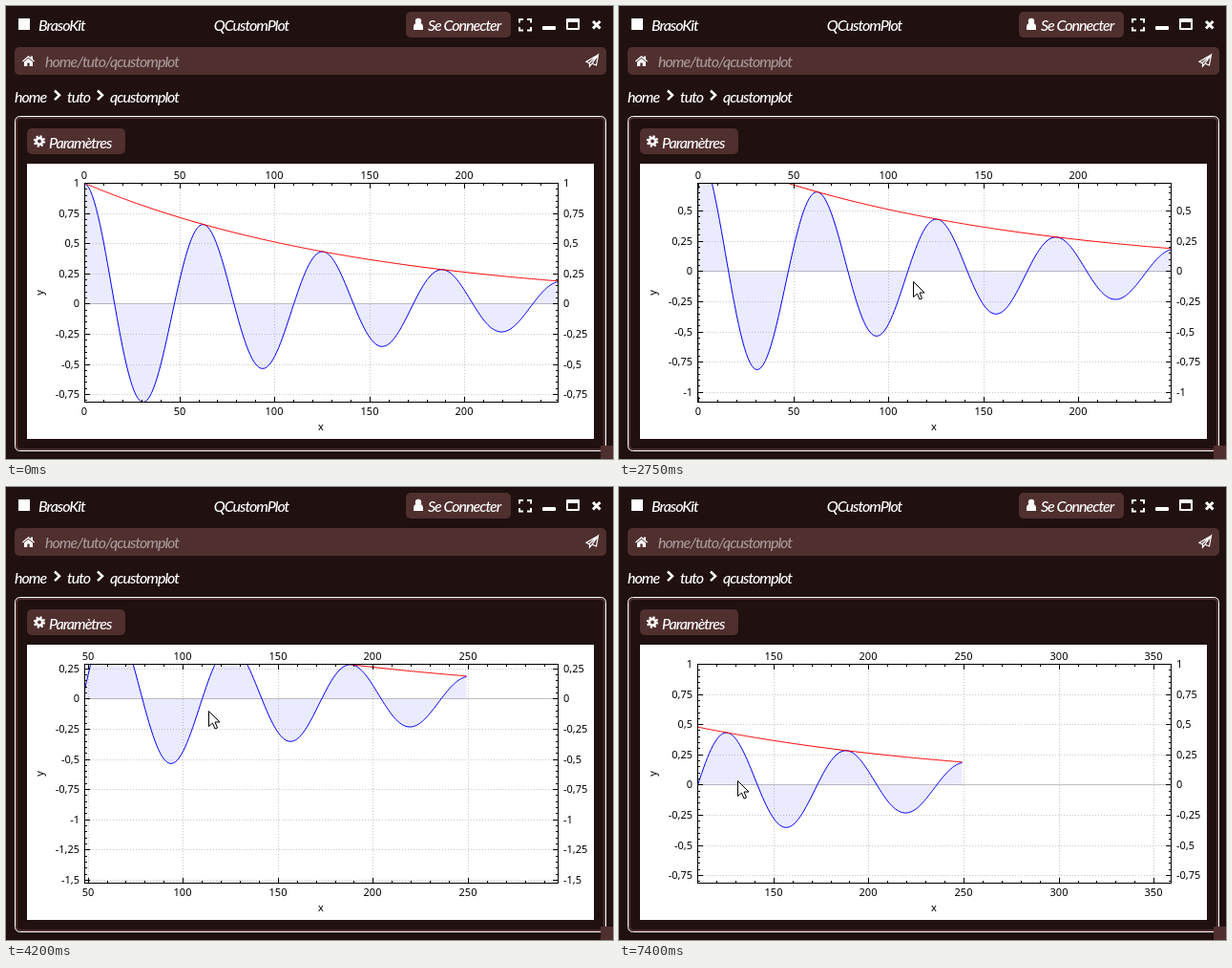
These frames come from a looping animation (636x474 px, 8 s). An HTML page:

```html
<!DOCTYPE html>
<html lang="fr">
<head>
<meta charset="utf-8">
<title>QCustomPlot</title>
<style>
html, body { margin: 0; width: 100%; height: 100%; overflow: hidden; background: #201010; }
svg { display: block; }
.ui { font: italic 500 16px Lato, "Open Sans", sans-serif; letter-spacing: -1px; fill: #fff; }
.tick { font: 11px "Noto Sans", "Open Sans", sans-serif; fill: #000; }
.mid { text-anchor: middle; }
.end { text-anchor: end; }
.panel { fill: #502f2f; }
.icon { fill: none; stroke: #fff; stroke-width: 2; }
.crisp { shape-rendering: crispEdges; }
.line { fill: none; stroke-width: 1; }
</style>
</head>
<body>
<svg width="636" height="474" viewBox="0 0 636 474">
  <defs>
    <clipPath id="area"><rect x="82" y="185" width="497" height="230"/></clipPath>
  </defs>
  <rect width="636" height="474" fill="#201010"/>

  <g class="ui">
    <rect x="13" y="13" width="12" height="12"/>
    <text x="34" y="26">BrasoKit</text>
    <text x="257" y="26" class="mid">QCustomPlot</text>

    <rect x="419" y="6" width="110" height="27" rx="5" class="panel"/>
    <circle cx="432" cy="16" r="3.2"/>
    <path d="M427 25v-2.500q0-4 2.500-4.500q2.500 2 5 0q2.500.5 2.500 4.500V25z"/>
    <text x="442" y="26">Se Connecter</text>

    <path class="icon" d="M538 17.500V14h4M546 14h4v3.500M550 22v3.500h-4M542 25.500h-4V22"/>
    <rect x="562" y="21" width="14" height="4" rx="1"/>
    <path fill-rule="evenodd" d="M588 13h12q1 0 1 1v10q0 1-1 1h-12q-1 0-1-1V14q0-1 1-1zM589 17v6h10v-6z"/>
    <path d="M615 16l7.500 7.500M622.500 16l-7.500 7.500" stroke="#fff" stroke-width="3"/>

    <rect x="9" y="43" width="620" height="29" rx="5" class="panel"/>
    <path d="M17 57.500L23.500 52l2.500 2v-1.500h2v3.300l2 1.700-.8.900L23.500 53.800 17.800 58.400z"/>
    <path d="M19 58.500l4.500-3.700 4.500 3.700V63h-3.300v-3.500h-2.400V63H19z"/>
    <text x="41" y="64" fill="#a89797">home/tuto/qcustomplot</text>
    <path class="icon" style="stroke-width:1.200" d="M620.500 51L608 58.300l3 1.500L620.500 51l-2 11-4.500-1.800-2.500 3v-3.400M614 60.200L620.500 51"/>

    <text x="9" y="101">home</text>
    <text x="64" y="101">tuto</text>
    <text x="109" y="101">qcustomplot</text>
    <path class="icon" style="stroke-width:2.500" d="M51 88.500l5 4.800-5 4.800M96 88.500l5 4.800-5 4.800"/>

    <rect x="11" y="117" width="616" height="347" rx="4" fill="none" stroke="#502f2f" stroke-width="2"/>
    <rect x="9.500" y="115.500" width="619" height="350" rx="5" fill="none" stroke="#fff"/>
    <rect x="623" y="460" width="13" height="14" class="panel"/>

    <rect x="22" y="128" width="103" height="27" rx="5" class="panel"/>
    <circle cx="35" cy="141.500" r="3.300" fill="none" stroke="#fff" stroke-width="2.800"/>
    <circle cx="35" cy="141.500" r="5.200" fill="none" stroke="#fff" stroke-width="2" stroke-dasharray="2.040"/>
    <text x="45" y="149">Paramètres</text>
  </g>

  <rect x="22" y="165" width="594" height="288" fill="#fff"/>
  <g clip-path="url(#area)">
    <g id="gridX" class="crisp"></g>
    <g id="gridY" class="crisp"></g>
    <g id="curves"></g>
    <g id="ticksX" class="crisp"></g>
    <g id="ticksY" class="crisp"></g>
  </g>
  <rect x="82.500" y="185.500" width="496" height="229" fill="none" stroke="#000" class="crisp"/>
  <g class="tick">
    <g id="labelsX" class="mid"></g>
    <g id="labelsY"></g>
    <text x="330" y="444" class="mid">x</text>
    <text class="mid" transform="translate(39 300) rotate(-90)">y</text>
  </g>
  <path id="pointer" d="M.5.500V16.500L4.500 13l2.500 6 2.500-1-2.500-6H12z" fill="#fff" stroke="#000"/>
</svg>
<script>
const LOOP = 8000;
const box = { l: 82, r: 578, t: 185, b: 414 };
const damp = x => Math.exp(-x / 150);
const wave = x => damp(x) * Math.cos(x / 10);
const xs = Array.from({ length: 250 }, (_, x) => x);
const low = Math.min(...xs.map(wave));
const X = v => box.l + v * (box.r - box.l) / 249;
const Y = v => box.t + (1 - v) * (box.b - box.t) / (1 - low);
const $ = id => document.getElementById(id);

function add(parent, tag, attrs, text) {
  const el = document.createElementNS("http://www.w3.org/2000/svg", tag);
  for (const k in attrs) el.setAttribute(k, attrs[k]);
  if (text !== undefined) el.textContent = text;
  return $(parent).appendChild(el);
}

// Axes: grid, ticks and labels are built once, then shifted.
const labels = [];
const label = (axis, pos, attrs, text) =>
  labels.push({ axis, pos, el: add("labels" + axis, "text", attrs, text) });
const gridLine = (id, d, zero) => add(id, "path", zero
  ? { d, class: "line", stroke: "#c0c0c0" }
  : { d, class: "line", stroke: "#c8c8c8", "stroke-dasharray": "1 2" });

for (let v = 0; v <= 400; v += 10) {
  const major = v % 50 === 0, n = major ? 6 : 3;
  const px = Math.round(X(v)), c = px + .5;
  add("ticksX", "path", { d: `M${c} 185v${n}M${c} 415v${-n}`, stroke: "#000" });
  if (!major) continue;
  gridLine("gridX", `M${c} 415V185`, v === 0);
  for (const y of [181, 428]) label("X", px, { x: px, y }, v);
}
for (let k = 20; k >= -36; k--) {
  const major = k % 5 === 0, n = major ? 6 : 3;
  const py = Math.round(Y(k / 20)), c = py + .5;
  add("ticksY", "path", { d: `M82 ${c}h${n}M579 ${c}h${-n}`, stroke: "#000" });
  if (!major) continue;
  gridLine("gridY", `M82 ${c}H579`, k === 0);
  const text = String(k / 20).replace(".", ",");
  label("Y", py, { x: 77, y: py + 4, class: "end" }, text);
  label("Y", py, { x: 584, y: py + 4 }, text);
}

const trace = f => xs.map(x =>
  `${(X(x) + .5).toFixed(2)} ${(Y(f(x)) + .5).toFixed(2)}`).join("L");
const base = Y(0) + .5;
add("curves", "path", { d: `M${X(0) + .5} ${base}L${trace(wave)}V${base}z`, fill: "#00f", "fill-opacity": .08 });
add("curves", "path", { d: "M" + trace(wave), class: "line", stroke: "#00f" });
add("curves", "path", { d: "M" + trace(damp), class: "line", stroke: "#f00" });

// Each move goes from the previous place to `to` in equal jumps, the first at
// `start`, the last at `end`. `pan` is the plot shift reached by a drag.
const moves = [
  { start: 500, to: [300, 354] },
  { start: 630, to: [201, 329] },
  { start: 780, end: 1060, jumps: 3, to: [308, 324] },
  { start: 2100, end: 2370, jumps: 3, to: [312, 307], pan: [4, -15] },
  { start: 2490, end: 3200, jumps: 6, to: [300, 251], pan: [-6, -71] },
  { start: 3320, end: 4200, jumps: 8, to: [212, 234], pan: [-96, -90] },
  { start: 4460, end: 5000, jumps: 5, to: [167, 232], pan: [-141, -90] },
  { start: 5440, to: [193, 236] },
  { start: 5560, to: [203, 231] },
  { start: 5700, end: 6000, jumps: 3, to: [203, 217] },
  { start: 6560, to: [181, 244], pan: [-158, -70] },
  { start: 6680, end: 7400, jumps: 6, to: [124, 307], pan: [-219, 0] }
];
const mix = (a, b, p) => a.map((v, i) => Math.round(v + (b[i] - v) * p));

function progress({ start, end = start, jumps = 1 }, t) {
  if (t >= end) return 1;
  const gap = (end - start) / (jumps - 1);
  return (Math.floor((t - start) / gap + .1) + 1) / jumps;
}

function stateAt(t) {
  let spot = null, pan = [0, 0];
  for (const m of moves) {
    if (t < m.start) break;
    const p = progress(m, t);
    spot = mix(spot || m.to, m.to, p);
    pan = mix(pan, m.pan || pan, p);
  }
  return { spot, pan };
}

function draw(t) {
  const { spot, pan: [dx, dy] } = stateAt(t);
  const move = (id, x, y) => $(id).setAttribute("transform", `translate(${x} ${y})`);
  for (const id of ["gridX", "ticksX", "labelsX"]) move(id, dx, 0);
  for (const id of ["gridY", "ticksY", "labelsY"]) move(id, 0, dy);
  move("curves", dx, dy);
  for (const { axis, pos, el } of labels) {
    const inside = axis === "X"
      ? pos + dx >= box.l && pos + dx <= box.r
      : pos + dy >= box.t && pos + dy <= box.b;
    el.style.display = inside ? "" : "none";
  }
  $("pointer").style.display = spot ? "" : "none";
  if (spot) move("pointer", ...spot);
}

let origin;
function tick(now) {
  origin ??= now;
  draw((now - origin) % LOOP);
  requestAnimationFrame(tick);
}
draw(0);
requestAnimationFrame(tick);
</script>
</body>
</html>
```
